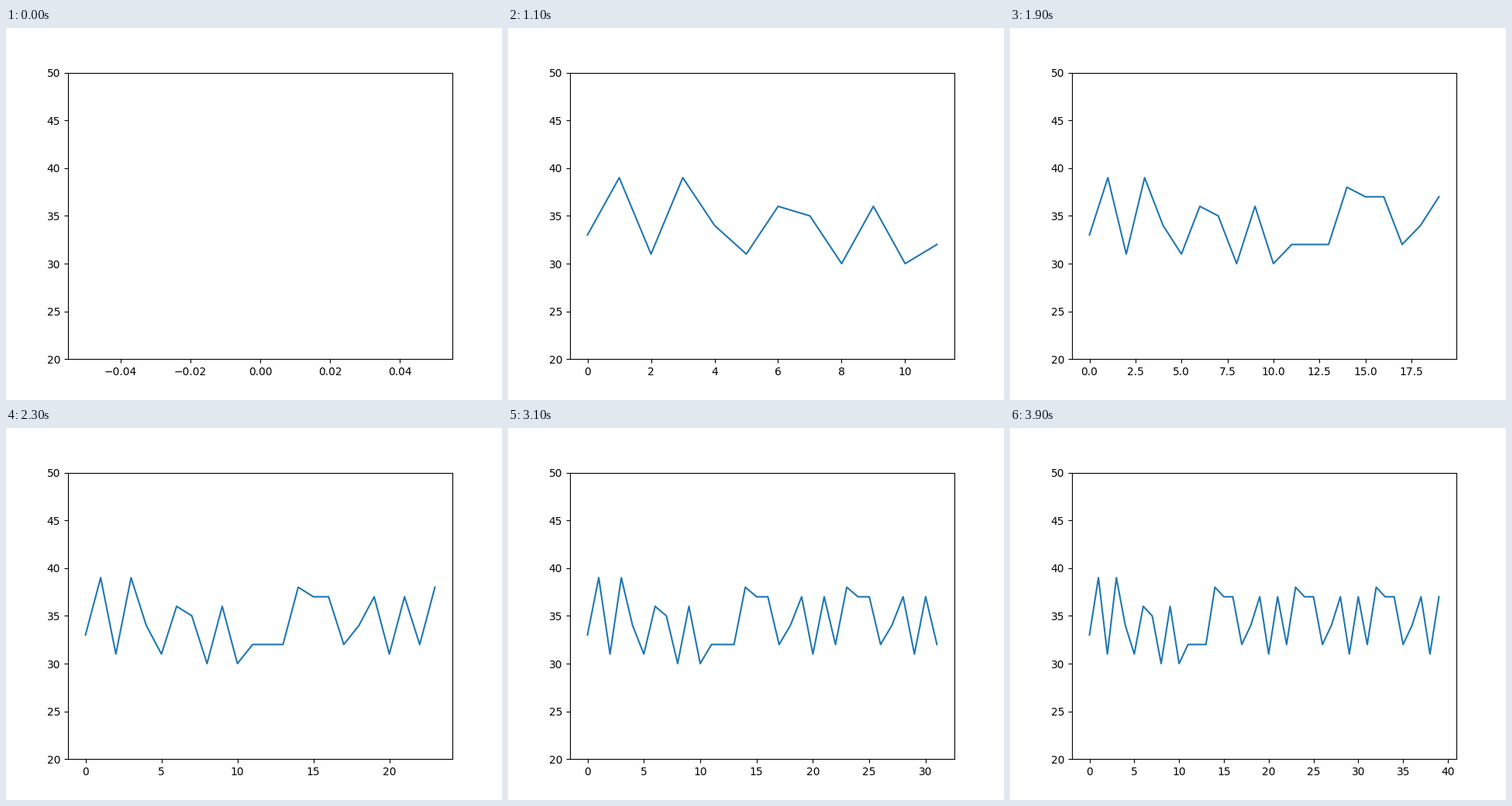
Write a matplotlib script that moves like this. It is 640 px wide and 480 px high and loops after 4000 ms.

```python
import matplotlib.pyplot as plt
from matplotlib.animation import FuncAnimation

# An irregular start settles into a nine-step rhythm.
START = [33, 39, 31, 39, 34, 31, 36, 35, 30, 36, 30, 32, 32]
CYCLE = [32, 38, 37, 37, 32, 34, 37, 31, 37]
readings = START + 3 * CYCLE

fig, ax = plt.subplots(figsize=(6.4, 4.8), dpi=100)
ax.set_ylim(20, 50)
line, = ax.plot([], [])


def update(step):
    """Show the readings so far and refit the x axis to them."""
    count = step + 1
    line.set_data(range(count), readings[:count])
    ax.relim()
    ax.autoscale_view(scaley=False)
    return line,


anim = FuncAnimation(fig, update, frames=len(readings), interval=100,
                     init_func=lambda: update(0), repeat=True, repeat_delay=0)
plt.show()
```
